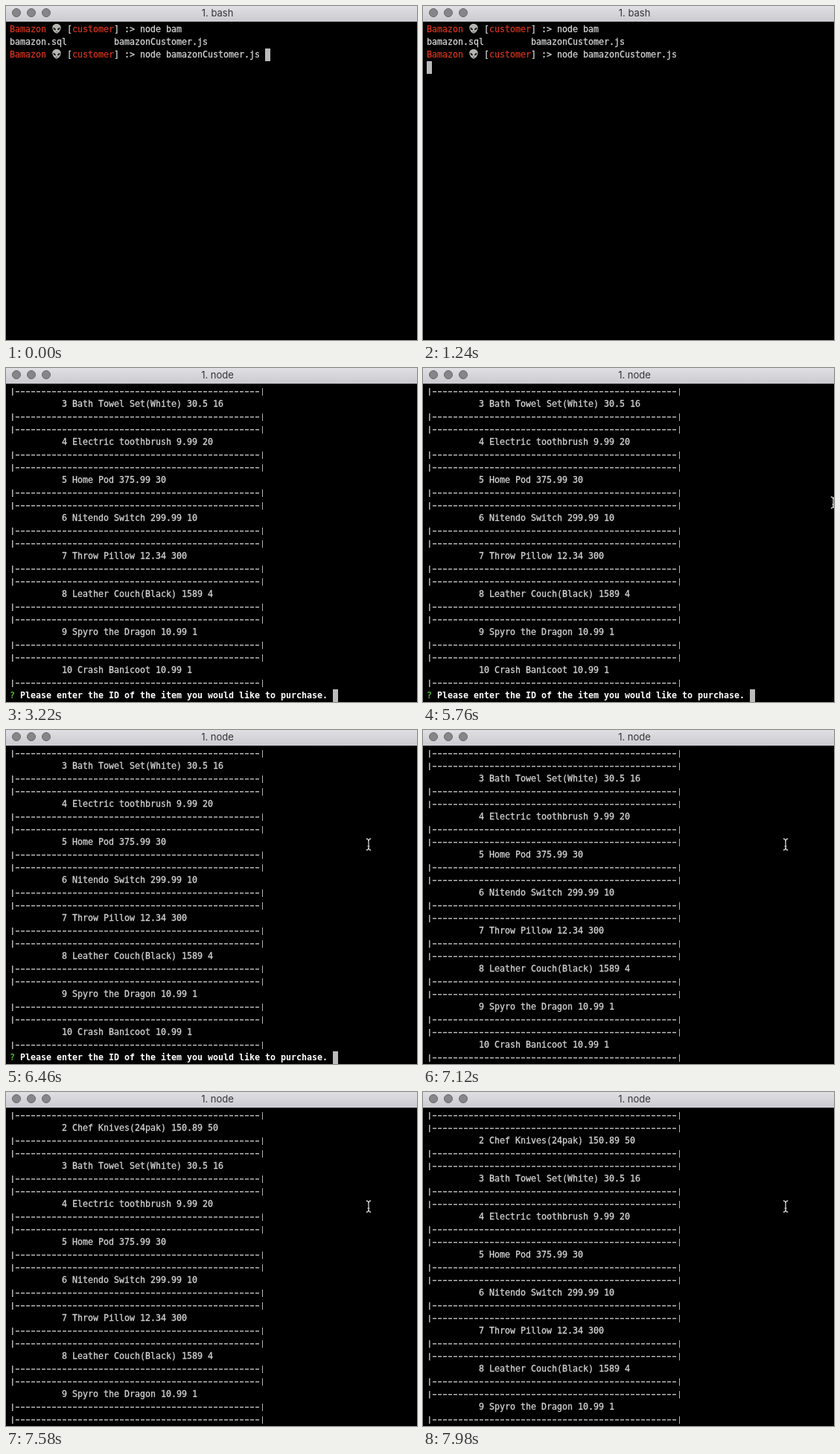
Write an HTML page that moves like this. It is 552 by 448 pixels and loops after 8 s.

```html
<!DOCTYPE html>
<html lang="en">
<head>
<meta charset="utf-8">
<title>Terminal</title>
<style>
  html, body { margin: 0; width: 100%; height: 100%; overflow: hidden; background: #000; }
  #stage {
    --row: 17px;
    position: relative; width: 552px; height: 448px; overflow: hidden; background: #000;
    font: 11.63px/17px "DejaVu Sans Mono", monospace;
    color: #d2d2d2; white-space: pre;
    -webkit-text-stroke: .3px currentColor;
  }
  #stage * { animation-duration: 8s; animation-iteration-count: infinite; animation-timing-function: step-end; }

  /* Title bar */
  #bar {
    position: absolute; inset: 0 0 auto; height: 21px; z-index: 2;
    background: linear-gradient(#e0dfe3, #cbcad0);
    font: 13px/19px Inter, sans-serif; color: #333336;
    -webkit-text-stroke: 0;
  }
  #bar i {
    position: absolute; top: 3px; width: 12px; height: 12px; box-sizing: border-box;
    border: 1px solid #69696b; border-radius: 50%; background: #868688;
  }
  #bar span { position: absolute; left: 0; width: 568px; text-align: center; }
  #bar .before { animation-name: title-out; }
  #bar .after { animation-name: title-in; }

  /* Terminal contents */
  #view { position: absolute; inset: 23px 0 0; overflow: hidden; }
  #shell, #list { position: absolute; left: 5px; top: 0; }
  #shell { animation-name: shell-out; }
  #list { top: calc(-6 * var(--row)); animation-name: list-in, scroll; }
  .line { height: var(--row); }
  .red { color: #d0321a; }
  .alien { display: inline-block; width: 14px; height: 15px; vertical-align: -3px; }
  .block { position: absolute; width: 7px; height: 17px; background: #bbb; }
  #caret { left: 343px; top: 34px; animation-name: enter; }

  .item { position: relative; height: 51px; line-height: 51px; padding-left: 70px; }
  .item::before, .item::after {
    content: ""; position: absolute; left: 3px; width: 337px; height: 10px; top: 4px;
    --ink: #b4b4b8;
    background:
      linear-gradient(var(--ink), var(--ink)) 0 0 / 1.5px 100% no-repeat,
      linear-gradient(var(--ink), var(--ink)) 100% 0 / 1.5px 100% no-repeat,
      repeating-linear-gradient(90deg, transparent 0 1px, var(--ink) 1px 6px, transparent 6px 7px)
        4px 4px / 329px 1.5px no-repeat;
  }
  .item::after { top: 38px; }
  .question { position: relative; font-weight: bold; color: #fff; -webkit-text-stroke: 0; }
  .question b { color: #4fb62c; }
  .question .block { left: 434px; top: 0; }

  #pointer { position: absolute; left: -4px; top: -8px; width: 8px; height: 17px; z-index: 3; animation-name: pointer; }
  #pointer path { fill: none; stroke: #e6e6e6; stroke-width: 1.2; }

  @keyframes title-out { 0% { opacity: 1 } 34%, 100% { opacity: 0 } }
  @keyframes title-in { 0% { opacity: 0 } 34%, 100% { opacity: 1 } }
  @keyframes shell-out { 0% { opacity: 1 } 37.5%, 100% { opacity: 0 } }
  @keyframes list-in { 0% { opacity: 0 } 37.5%, 100% { opacity: 1 } }
  @keyframes enter { 0% { transform: none } 14%, 100% { transform: translate(-343px, 17px) } }
  @keyframes scroll {
    0% { transform: none }
    88.98% { transform: translateY(17px) }
    91.25% { transform: translateY(34px) }
    93.5% { transform: translateY(51px) }
    96%, 100% { transform: translateY(68px) }
  }
  @keyframes pointer {
    0% { transform: translate(570px, 180px) }
    71.98% { transform: translate(551px, 180px); animation-timing-function: steps(6, end) }
    75.5% { transform: translate(516px, 190px) }
    78.5% { transform: translate(516px, 190px); animation-timing-function: steps(5, start) }
    80.75%, 100% { transform: translate(487px, 153px) }
  }
</style>
</head>
<body>
<div id="stage">
  <div id="bar"><i style="left:8px"></i><i style="left:28px"></i><i style="left:48px"></i><span class="before">1. bash</span><span class="after">1. node</span></div>
  <div id="view"><div id="shell"></div><div id="list"></div></div>
  <svg id="pointer" viewBox="0 0 8 17"><path d="M.8 .8Q4 1 4 4.5V12.5Q4 16 .8 16.2M7.2 .8Q4 1 4 4.5M4 12.5Q4 16 7.2 16.2M2.5 11H5.5"/></svg>
</div>
<script>
  const items = [
    "", "2 Chef Knives(24pak) 150.89 50", "3 Bath Towel Set(White) 30.5 16",
    "4 Electric toothbrush 9.99 20", "5 Home Pod 375.99 30",
    "6 Nitendo Switch 299.99 10", "7 Throw Pillow 12.34 300",
    "8 Leather Couch(Black) 1589 4", "9 Spyro the Dragon 10.99 1",
    "10 Crash Banicoot 10.99 1"
  ];
  const alien = `<svg class="alien" viewBox="0 0 14 15"><path fill="#b4b6b2" d="M7 1C3 1 1 3.5 1.3 6.5C1.6 9.8 4.8 13.8 7 13.8S12.4 9.8 12.7 6.5C13 3.5 11 1 7 1Z"/><path fill="#141414" d="M2.4 6Q5.8 6 6 9.6Q2.8 9.6 2.4 6ZM11.6 6Q8.2 6 8 9.6Q11.2 9.6 11.6 6Z"/><path stroke="#4b4b4b" d="M5.8 11.7H8.2"/></svg>`;
  const line = html => `<div class="line">${html}</div>`;
  const prompt = command => line(
    `<span class="red">Bamazon</span> ${alien} [<span class="red">customer</span>] :&gt; ${command}`);

  document.getElementById("shell").innerHTML =
    prompt("node bam") +
    line("bamazon.sql".padEnd(20) + "bamazonCustomer.js") +
    prompt("node bamazonCustomer.js") +
    `<div id="caret" class="block"></div>`;

  document.getElementById("list").innerHTML =
    items.map(text => `<div class="item">${text}</div>`).join("") +
    `<div class="line question"><b>?</b> Please enter the ID of the item you would like to purchase.<div class="block"></div></div>`;
</script>
</body>
</html>
```
